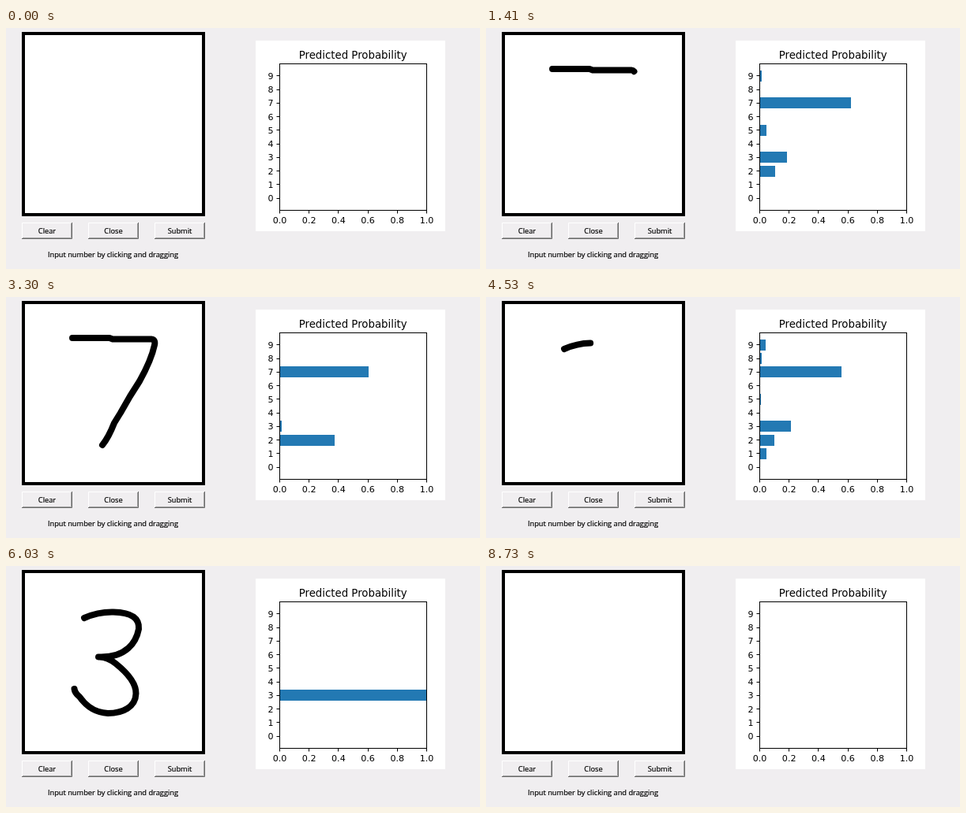
These frames come from a looping animation (600 by 306 pixels, 9.03 s). An HTML page:

```html
<!DOCTYPE html>
<html lang="en">
<head>
<meta charset="utf-8">
<title>Digit recogniser</title>
<style>
  html, body { margin: 0; width: 100%; height: 100%; overflow: hidden; background: #f0eef0; }
  svg { display: block; width: 600px; height: 306px; }
  .ui { font: 9.25px "Open Sans", "Noto Sans", sans-serif; text-anchor: middle; }
  .ui text, text.ui { stroke: #000; stroke-width: .2; }
  .plot { font: 11.1px "DejaVu Sans", sans-serif; text-anchor: middle; }
  .plot .title { font-size: 13.3px; }
  .plot .digit { text-anchor: end; }
  .line { fill: none; stroke: #000; }
  #bars { fill: #2379b3; shape-rendering: crispEdges; }
  #ink { fill: none; stroke: #000; stroke-width: 8; stroke-linecap: round; stroke-linejoin: round; }
</style>
</head>
<body>
<svg viewBox="0 0 600 306">
  <rect width="600" height="306" fill="#f0eef0"/>
  <rect x="22" y="7" width="228" height="230" fill="#fff" stroke="#000" stroke-width="4"/>
  <path id="ink" pathLength="1"/>
  <g id="buttons" class="ui"></g>
  <text class="ui" x="135.5" y="291">Input number by clicking and dragging</text>
  <rect x="316" y="16" width="240" height="242" fill="#fff"/>
  <g id="bars"></g>
  <g id="axes" class="plot">
    <rect class="line" x="346.5" y="45.5" width="186" height="186"/>
    <text class="title" x="439.2" y="38.5">Predicted Probability</text>
  </g>
</svg>
<script>
const LOOP = 9030, STEP = 30;
const LEFT = 346.5, SPAN = 186, ROW = 17.25, BAR = 13.8;
const rowY = digit => 216.1 - digit * ROW;

// The guess for a single dot of ink
const unsure = { 1: .06, 2: .13, 3: .15, 4: .08, 5: .2, 7: .28, 8: .04, 9: .05 };

// keys: time, share of the stroke drawn, probability per digit
const strokes = [
  {
    clear: 3960,
    path: "M84 52H131L135 53.5H184Q189.5 54 188 61Q184 80 169 107L157 126L145 147L137 160Q130 178 122 188",
    keys: [
      [30, 0, unsure],
      [930, .09, unsure],
      [1410, .41, { 2: .105, 3: .185, 5: .045, 7: .62, 9: .013 }],
      [2010, .85, { 2: .1, 3: .03, 7: .865 }],
      [2190, 1, { 2: .375, 3: .013, 7: .604 }]
    ]
  },
  {
    clear: 6390,
    path: "M99 66Q117 58 136 58.5C160 59 169 67 168 80C165 96 153 117 117 115.5" +
      "Q128 115 139 124Q165 145 164.5 162C164 179 148 187 129 187C108 186 98 173 93 166Q87 161 86.5 156",
    keys: [
      [4440, 0, unsure],
      [4530, .105, { 1: .045, 2: .1, 3: .215, 5: .007, 7: .555, 8: .012, 9: .04 }],
      [5310, .58, { 3: .98 }],
      [6030, 1, { 3: 1 }]
    ]
  },
  {
    clear: 8730,
    path: "M129.5 52.5V84L131 90L132 150V190",
    keys: [
      [6870, 0, unsure],
      [7200, .435, { 0: .007, 1: .452, 3: .013, 4: .348, 5: .06, 6: .006, 7: .06, 9: .012 }],
      [7860, 1, { 1: .985 }]
    ]
  }
];

const byId = id => document.getElementById(id);
const mix = (a, b, k) => a + (b - a) * k;

function add(parent, tag, attrs, text = "") {
  const node = document.createElementNS("http://www.w3.org/2000/svg", tag);
  for (const key in attrs) node.setAttribute(key, attrs[key]);
  node.textContent = text;
  return parent.appendChild(node);
}

["Clear", "Close", "Submit"].forEach((label, i) => {
  const box = byId("buttons"), x = 20 + 84 * i;
  const edge = (d, stroke) => add(box, "path", { d, stroke, fill: "none" });
  edge(`M${x + .5} 268V247.5H${x + 63}`, "#fff");
  edge(`M${x + 1} 266.5H${x + 62.5}V248`, "#a0a0a0");
  edge(`M${x} 267.5H${x + 63.5}V247`, "#696969");
  add(box, "text", { x: x + 32, y: 260.6 }, label);
});

const axes = byId("axes");
for (let i = 0; i <= 5; i++) {
  const x = LEFT + SPAN * i / 5;
  add(axes, "path", { class: "line", d: `M${Math.floor(x) + .5} 232v3.5` });
  add(axes, "text", { x, y: 248 }, (i / 5).toFixed(1));
}

const bars = [];
for (let digit = 0; digit < 10; digit++) {
  const y = rowY(digit);
  add(axes, "path", { class: "line", d: `M342.5 ${Math.floor(y) + .5}h4` });
  add(axes, "text", { class: "digit", x: 338.6, y: y + 4 }, digit);
  bars.push(add(byId("bars"), "rect", { x: LEFT, y: y - BAR / 2, height: BAR, width: 0 }));
}

// Share drawn and odds at time t, between the two neighbouring keys
function sample(keys, t) {
  const next = keys.findIndex(key => key[0] > t);
  const [t1, drawn1, odds1] = keys.at(next);
  const [t0, drawn0, odds0] = next < 0 ? keys.at(-1) : keys[next - 1];
  const k = next < 0 ? 1 : (t - t0) / (t1 - t0);
  return {
    drawn: mix(drawn0, drawn1, k),
    odds: digit => mix(odds0[digit] || 0, odds1[digit] || 0, k)
  };
}

function draw(t) {
  const stroke = strokes.find(s => t >= s.keys[0][0] && t < s.clear);
  const { drawn, odds } = stroke ? sample(stroke.keys, t) : { drawn: 0, odds: () => 0 };
  const ink = byId("ink");
  ink.setAttribute("d", stroke ? stroke.path : "");
  ink.setAttribute("stroke-dasharray", `${Math.max(drawn, .001)} 2`);
  bars.forEach((bar, digit) => bar.setAttribute("width", SPAN * odds(digit)));
}

const begin = performance.now();
function tick() {
  const t = (performance.now() - begin) % LOOP;
  draw(Math.floor(t / STEP) * STEP);
  requestAnimationFrame(tick);
}
tick();
</script>
</body>
</html>
```
